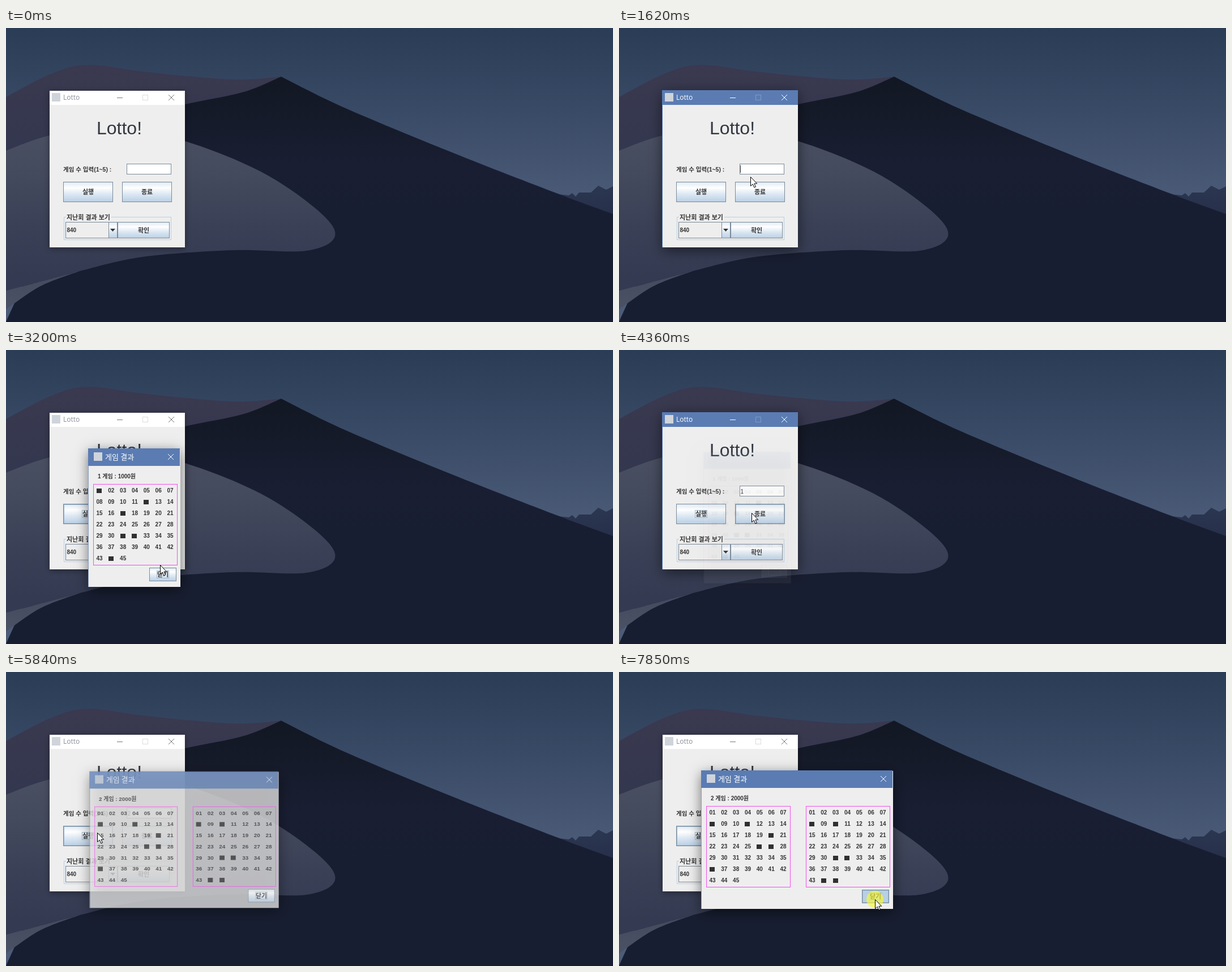
An HTML page with a canvas that plays this animation: 1072x520 px, repeating every 8000 ms.

```html
<!DOCTYPE html>
<html lang="ko">
<head>
<meta charset="utf-8">
<title>Lotto</title>
<style>
html, body { margin: 0; width: 100%; height: 100%; overflow: hidden; background: #181e31; }
canvas { display: block; }
</style>
</head>
<body>
<canvas id="stage" width="1072" height="520"></canvas>
<script>
const LOOP = 8000, STEP = 75;
const BLUE = '#5a7cb3', PANEL = '#eeeeee', EDGE = '#7a8a99', INK = '#333333', PALE = '#b8cfe5';
const SANS = '"Liberation Sans", "Noto Sans CJK KR", "Noto Sans CJK", sans-serif';
const UI = '"Open Sans", "Noto Sans CJK KR", "Noto Sans CJK", sans-serif';
const stage = document.getElementById('stage');
let c = stage.getContext('2d');

// ---------- helpers ----------
function fill(x, y, w, h, color) {
  c.fillStyle = color;
  c.fillRect(x, y, w, h);
}

function outline(x, y, w, h, color) {
  c.strokeStyle = color;
  c.lineWidth = 1;
  c.strokeRect(x + 0.5, y + 0.5, w - 1, h - 1);
}

function cross(x, y, color) {
  c.strokeStyle = color;
  c.lineWidth = 1;
  c.beginPath();
  for (const s of [-1, 1]) {
    c.moveTo(x - 5, y - 5 * s);
    c.lineTo(x + 5, y + 5 * s);
  }
  c.stroke();
}

function text(s, x, y, font, color = INK, align = 'left') {
  c.font = font;
  c.fillStyle = color;
  c.textAlign = align;
  c.fillText(s, x, y);
}

const bold = size => `bold ${size}px ${SANS}`;

function vertical(y0, y1, ...colors) {
  const g = c.createLinearGradient(0, y0, 0, y1);
  colors.forEach((col, i) => g.addColorStop(i / (colors.length - 1), col));
  return g;
}

// Catmull-Rom curve through the points
function spline(p) {
  c.lineTo(...p[0]);
  for (let i = 0; i < p.length - 1; i++) {
    const a = p[i - 1] || p[i], b = p[i], d = p[i + 1], e = p[i + 2] || d;
    c.bezierCurveTo(b[0] + (d[0] - a[0]) / 6, b[1] + (d[1] - a[1]) / 6,
      d[0] - (e[0] - b[0]) / 6, d[1] - (e[1] - b[1]) / 6, d[0], d[1]);
  }
}

function shape(color, ...curves) {
  c.beginPath();
  curves.forEach(spline);
  c.closePath();
  c.fillStyle = color;
  c.fill();
}

// ---------- landscape ----------
function paintDesert() {
  fill(0, 0, 1072, 520, vertical(0, 310, '#2b3c56', '#3a4b67', '#4b5b78'));

  c.beginPath();
  [[975, 294], [994, 296], [1000, 292], [1006, 298], [1012, 291], [1033, 291], [1046, 279], [1060, 286],
   [1072, 280], [1072, 335]].forEach(p => c.lineTo(...p));
  c.fillStyle = vertical(279, 330, '#2b3650', '#27304a');
  c.fill();

  shape(vertical(65, 220, '#3a394f', '#33374f'),
    [[0, 122], [80, 81], [145, 65], [250, 78], [400, 91], [486, 86]],
    [[486, 200], [0, 300]]);

  shape(vertical(86, 330, '#121723', '#161b2b', '#191e33', '#181e31'),
    [[0, 520], [150, 190]],
    [[200, 162], [316, 135], [420, 113], [486, 86]],
    [[486, 86], [600, 142], [800, 225], [985, 297], [1072, 329]],
    [[1072, 520]]);

  shape(vertical(172, 440, '#4b5163', '#444a5d', '#3a4056', '#343a51'),
    [[0, 217], [77, 190], [190, 172], [316, 200], [450, 254], [550, 322], [581, 368], [530, 394],
     [400, 393], [240, 405], [130, 430]],
    [[0, 465]]);

  shape(vertical(430, 498, '#434a5e', '#4b5265'),
    [[0, 465], [130, 430]],
    [[130, 430], [60, 457], [0, 498]]);
}

const desert = document.createElement('canvas');
desert.width = stage.width;
desert.height = stage.height;
const main = c;
c = desert.getContext('2d');
paintDesert();
c = main;

// ---------- widgets ----------
function metal(x, y, w, h) {
  const g = c.createLinearGradient(0, y, 0, y + h);
  g.addColorStop(0, '#dde8f3');
  g.addColorStop(0.3, '#ffffff');
  g.addColorStop(0.6, '#dde8f3');
  g.addColorStop(1, PALE);
  fill(x, y, w, h, g);
}

function button(x, y, w, h, label, { hover, down, focus } = {}) {
  if (down) fill(x, y, w, h, PALE);
  else metal(x, y, w, h);
  if (hover || down) outline(x + 1, y + 1, w - 2, h - 2, '#9ab5cf');
  outline(x, y, w, h, EDGE);
  const cx = x + w / 2, cy = y + h / 2;
  if (focus) outline(cx - 11, cy - 7, 22, 14, '#a3b8cc');
  text(label, cx, cy + 4, bold(11), INK, 'center');
}

function shadowBox(x, y, w, h, active) {
  c.save();
  c.shadowColor = active ? 'rgba(0,0,0,.55)' : 'rgba(0,0,0,.4)';
  c.shadowBlur = active ? 22 : 10;
  c.shadowOffsetY = active ? 5 : 2;
  fill(x, y, w, h, PANEL);
  c.restore();
}

function mainWindow(s) {
  const on = s.active, ink = on ? '#ffffff' : '#777777';
  shadowBox(77, 111, 239, 277, on);
  if (on) {
    fill(76, 110, 240, 26, BLUE);
    fill(76, 136, 1, 252, BLUE);
  } else {
    fill(77, 111, 238, 25, '#ffffff');
  }
  fill(77, 136, 239, 252, PANEL);
  fill(81, 115, 15, 15, '#cfd4db');
  text('Lotto', 101, 127, `12px ${UI}`, on ? '#ffffff' : '#8a8f98');
  fill(196, 123, 10, 1, ink);
  outline(241, 118, 10, 10, on ? '#7f9ac4' : '#dcdcdc');
  cross(292, 123, ink);

  text('Lotto!', 200, 188, `32px ${SANS}`, '#333740', 'center');
  text('게임 수 입력(1~5) :', 101, 254, bold(10.5));
  fill(213, 240, 79, 19, '#ffffff');
  outline(213, 240, 79, 19, EDGE);
  text(s.value, 214.5, 254, `10px ${SANS}`);
  if (s.caret) fill(s.value ? 220 : 214, 243, 1, 13, '#555555');

  button(101, 272, 88, 36, '실행', { hover: s.runHover, down: s.runDown, focus: s.runFocus });
  button(205, 272, 88, 36, '종료', { hover: s.quitHover });

  outline(102, 334, 190, 41, PALE);
  fill(106, 329, 80, 11, PANEL);
  text('지난회 결과 보기', 107, 339, bold(11));
  outline(105, 343, 92, 29, EDGE);
  metal(181, 343, 16, 29);
  outline(181, 343, 16, 29, EDGE);
  shape(INK, [[184, 355], [193, 355]], [[188.5, 360]]);
  text('840', 107.5, 361, bold(10));
  button(197, 343, 92, 29, '확인');
}

function ticket(x, drawn) {
  outline(x, 237, 149, 144, '#f54cf0');
  for (let n = 1; n <= 45; n++) {
    const cx = x + 11 + (n - 1) % 7 * 20.83;
    const cy = 248.5 + Math.floor((n - 1) / 7) * 20;
    if (drawn.includes(n)) fill(Math.round(cx - 5), cy - 3.5, 9, 8, '#303030');
    else text(String(n).padStart(2, '0'), cx, cy + 3.5, bold(10), INK, 'center');
  }
}

const DRAWS = {
  1: [[1, 12, 17, 31, 32, 44]],
  2: [[8, 11, 20, 26, 27, 36], [8, 10, 31, 32, 44, 45]]
};

function dialog({ games, alpha, closeHover, closeDown }) {
  const w = games * 176 - 13, mx = 145 + w / 2, my = 296.5, k = 0.945 + 0.055 * alpha;
  c.save();
  c.globalAlpha = alpha;
  c.translate(mx, my);
  c.scale(k, k);
  c.translate(-mx, -my);
  shadowBox(146, 175, w - 1, 244, true);
  fill(145, 174, w - 1, 31, BLUE);
  fill(145, 205, 1, 214, '#8ea3c4');
  fill(155, 181, 15, 15, '#cfd4db');
  text('게임 결과', 175, 194, `13px ${UI}`, '#ffffff');
  cross(128 + w, 189, '#ffffff');
  text(`${games} 게임 : ${games}000원`, 162, 227, bold(10));
  DRAWS[games].forEach((drawn, i) => ticket(154 + i * 176, drawn));
  button(90 + w, 385, 48, 24, '닫기', { hover: closeHover, down: closeDown, focus: true });
  c.restore();
}

// ---------- pointer ----------
const smooth = u => u < 0.5 ? 2 * u * u : 1 - 2 * (1 - u) ** 2;
const slowing = u => 1 - (1 - u) ** 2;

// Each move starts where the one before ended
const MOVES = [
  { at: 140, steps: 9, to: [161, 224], ease: smooth },
  { at: 815, steps: 2, to: [251, 255] },
  { at: 980, steps: 1, to: [250, 254] },
  { at: 1470, steps: 3, to: [232, 263] },
  { at: 1695, steps: 2, to: [175, 271] },
  { at: 2253, steps: 2, to: [173, 279] },
  { at: 2960, steps: 4, to: [272, 380], ease: smooth },
  { at: 3260, steps: 2, to: [276, 393] },
  { at: 3490, steps: 2, to: [276, 398] },
  { at: 4285, steps: 2, to: [234, 288] },
  { at: 4435, steps: 3, to: [225, 263], ease: slowing },
  { at: 4740, steps: 2, to: [228, 249] },
  { at: 5213, steps: 4, to: [161, 284], ease: smooth },
  { at: 6140, steps: 3, to: [208, 303] },
  { at: 6365, steps: 7, to: [451, 409], ease: slowing },
  { at: 7070, steps: 3, to: [452, 402] }
];

function pointerAt(t) {
  let pos = [890, 503];
  for (const { at, steps, to, ease = u => u } of MOVES) {
    if (t < at) break;
    const u = ease(Math.min(1, (Math.floor((t - at) / STEP) + 1) / steps));
    pos = pos.map((v, i) => v + (to[i] - v) * u);
  }
  return pos.map(Math.round);
}

function arrow(x, y) {
  c.beginPath();
  [[0, 0], [0, 16], [3.8, 12.6], [6.4, 18.6], [9, 17.5], [6.4, 11.7], [11.2, 11.7]]
    .forEach(([dx, dy]) => c.lineTo(x + 0.5 + dx, y + 0.5 + dy));
  c.closePath();
  c.fillStyle = '#ffffff';
  c.fill();
  c.strokeStyle = '#000000';
  c.lineWidth = 1;
  c.stroke();
}

function beam(x, y) {
  fill(x, y - 6, 1, 15, '#000');
  for (const end of [y - 7, y + 9]) {
    fill(x - 3, end, 3, 1, '#000');
    fill(x + 1, end, 3, 1, '#000');
  }
}

// ---------- timeline ----------
const during = (t, a, b) => t >= a && t < b;
const inside = (p, x, y, w, h) => p[0] >= x && p[0] < x + w && p[1] >= y && p[1] < y + h;

function fadeIn(t, from) {
  return slowing(Math.min(1, (Math.floor((t - from) / STEP) + 1) / 4));
}

function dialogAlpha(t) {
  if (during(t, 2560, 4285)) return fadeIn(t, 2560);
  if (during(t, 4285, 4435)) return t < 4360 ? 0.5 : 0.05;
  return t >= 5740 ? fadeIn(t, 5740) : 0;
}

function draw(t) {
  const p = pointerAt(t);
  const modal = during(t, 2560, 4285) || t >= 5740;
  const ready = t >= 1150 && !modal;
  const runDown = during(t, 2407, 2560) || during(t, 5600, 5740);
  const closeDown = during(t, 4210, 4285) || t >= 7780;
  const fieldDown = during(t, 1150, 1300) || during(t, 4898, 5056);
  const games = t < 5000 ? 1 : 2;
  const alpha = dialogAlpha(t);

  c.drawImage(desert, 0, 0);
  mainWindow({
    active: ready,
    value: t < 2100 ? '' : t < 5134 ? '1' : '2',
    caret: during(t, 1150, 2407) || during(t, 4898, 5600),
    runHover: modal || (ready && inside(p, 101, 271, 88, 37)),
    runDown,
    runFocus: during(t, 2407, 4898) || t >= 5600,
    quitHover: ready && inside(p, 205, 272, 88, 36)
  });
  if (alpha) {
    const closeHover = inside(p, games * 176 + 77, 385, 48, 24);
    dialog({ games, alpha, closeDown, closeHover });
  }

  if (runDown || closeDown || fieldDown) {
    c.fillStyle = 'rgba(250,250,50,.65)';
    c.beginPath();
    c.arc(p[0], p[1], 15, 0, Math.PI * 2);
    c.fill();
  }
  // The pointer hides while typing
  if (t >= 140 && !during(t, 1940, 2253)) {
    const overField = !modal && inside(p, 213, 240, 79, 19);
    (overField ? beam : arrow)(...p);
  }
}

let origin;
function tick(now) {
  origin ??= now;
  draw((now - origin) % LOOP);
  requestAnimationFrame(tick);
}
requestAnimationFrame(tick);
</script>
</body>
</html>
```
